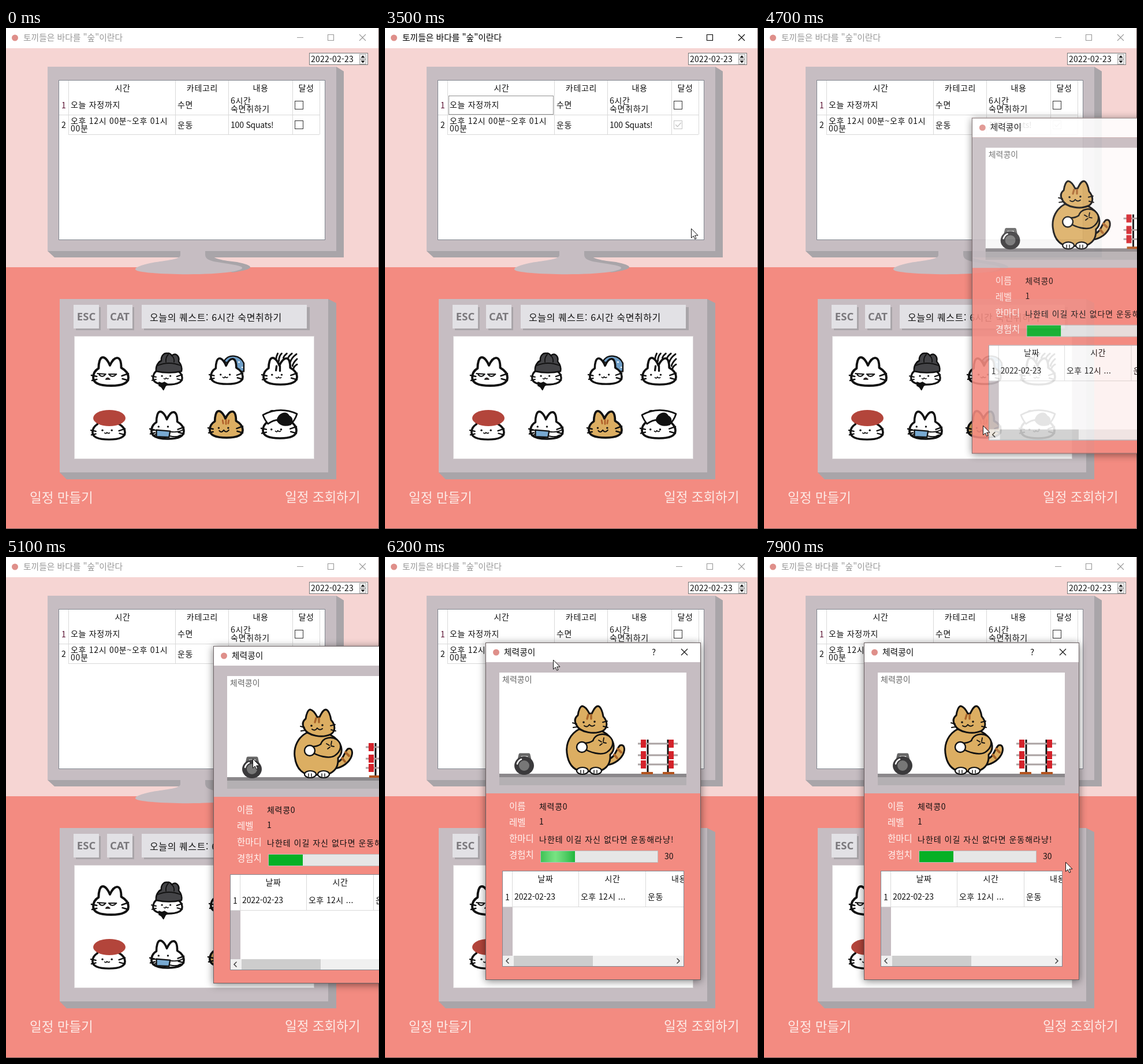
Recreate the animation shown at these times as an HTML page. Size 646 by 867 pixels, loop 8 s.

```html
<!DOCTYPE html>
<html lang="ko">
<head>
<meta charset="utf-8">
<title>Schedule</title>
<style>
html, body { margin: 0; width: 100%; height: 100%; overflow: hidden; }
svg { display: block; }
#stage { width: 100vw; height: 100vh; }
text { font: 14px "Noto Sans CJK KR", "Noto Sans CJK JP", "Noto Sans CJK", sans-serif; white-space: pre; }
#dialog > rect:first-child { filter: drop-shadow(0 2px 7px rgba(0,0,0,.5)); }
</style>
</head>
<body>
<svg id="stage" viewBox="0 0 646 867" preserveAspectRatio="none"></svg>
<script>
const LOOP = 8000, STEP = 100;
const GREY = '#c6bdc2', SHADE = '#a9a5a9', SALMON = '#f38b81', INK = '#111';

const rect = (x, y, w, h, fill, more = '') =>
  `<rect x="${x}" y="${y}" width="${w}" height="${h}" fill="${fill}" ${more}/>`;
const path = (d, fill = 'none', stroke = 'none', width = 1, more = '') =>
  `<path d="${d}" fill="${fill}" stroke="${stroke}" stroke-width="${width}" stroke-linecap="round" stroke-linejoin="round" ${more}/>`;
const line = (d, color = '#d9d9d9', width = 1) =>
  `<path d="${d}" fill="none" stroke="${color}" stroke-width="${width}"/>`;
const oval = (x, y, rx, ry, fill, more = '') =>
  `<ellipse cx="${x}" cy="${y}" rx="${rx}" ry="${ry}" fill="${fill}" ${more}/>`;
const text = (s, x, y, { size = 14, gap = .7, fill = INK, mid = false, more = '' } = {}) =>
  `<text x="${x}" y="${y}" fill="${fill}" letter-spacing="${gap}" style="font-size:${size}px;${more}"${mid ? ' text-anchor="middle"' : ''}>${s}</text>`;
const group = (inner, attrs) => `<g ${attrs}>${inner}</g>`;
const frame = (x, y, w, h, fill, stroke) => rect(x + .5, y + .5, w - 1, h - 1, fill, `stroke="${stroke}"`);
const cross = (x, y) => `M${x} ${y}l11 11m0-11l-11 11`;

// A cat head drawn in a 62 x 52 box
const HEAD = 'M2 37C2 28 6 24 11 21C11 12 13 2 18 2C23 2 28 10 30 16C33 9 38 2 43 3C48 4 49 13 49 20C56 24 61 30 61 37C61 47 50 51 32 51C12 51 2 47 2 37Z';
const WHISKERS = 'M-1 33l9 2M0 42l8-2M50 34l11-4M51 39l10 3';
const eyes = (x = 20, y = 33) => oval(x, y, 1.8, 1.8, INK) + oval(x + 17, y, 1.8, 1.8, INK);
const MOUTH = path('M24 38q3 3 4-1q3 3 5 1', 'none', INK, 1.8);

function cat(x, y, w, h, { fill = '#fff', back = '', front = eyes() + MOUTH } = {}) {
  const inner = back + path(HEAD, fill, INK, 3.8) + path(WHISKERS, 'none', INK, 2.6) + front;
  return group(inner, `transform="translate(${x} ${y}) scale(${w / 62} ${h / 52})"`);
}

function cats() {
  const grumpy = path('M9 30l14 1M28 31h13M12 32q5 6 10 0M29 32q5 6 11 0', 'none', INK, 2) +
    path('M23 40q3-5 7 0Z', '#744', INK, 1.5);
  const hood = path('M260 594C259 584 264 578 269 576C268 567 274 562 279 563C283 562 286 565 287 567C294 561 301 568 299 577C304 583 305 589 304 594Q282 599 260 594Z', '#444447', INK, 2.6) +
    path('M263 584Q282 576 302 584M281 565q-5 5-4 13M287 567q5 4 4 11', 'none', INK, 1.8);
  const beard = path('M14 46l6 2 5-2 7 4-5 4-4 8-4-6-5-3Z', INK, INK, 2);
  const nightcap = path('M27 6C36-7 56-5 63 11V27H54Q48 12 28 9Z', '#6f9fc8', INK, 2.6) +
    oval(44, 3, 1.6, 1.6, '#fff') + oval(54, 9, 1.6, 1.6, '#fff') + oval(60, 19, 1.3, 1.3, '#fff');
  const stripes = path('M27-6q-3 6-3 11M34-6q-5 5-5 14M43-6q-5 4-6 8M52-6q-6 5-7 9M60-5q-9 7-11 15M61 4q-7 7-8 13M61 14q-5 3-6 7', 'none', INK, 3);
  const mask = path('M2 36L12 35M36 38Q50 40 59 35M10 43l-5 2M36 46q12 3 19-2', 'none', INK, 2) +
    path('M11 35L36 37L34 48L11 47Z', '#78a9d1', INK, 2.5);
  const tabby = path('M25 19l1 6M31 18v8M36 19l-1 6', 'none', '#b0602a', 2.8) + eyes(18) +
    path('M19 38q4 5 8-1q4 6 9 0', 'none', INK, 2.2);
  const brim = path('M2 9Q31-7 62 7Q58 20 50 26Q30 10 11 25Q5 18 2 9Z', '#fff', INK, 2.8);
  const blob = path('M27 19C29 7 42 1 48 11C55 14 54 22 51 26Q38 31 30 23Z', INK, INK, 2);
  return cat(149, 568, 64, 52, { front: grumpy }) +
    cat(253, 575, 53, 43, { front: eyes() + MOUTH + beard }) + hood +
    cat(353, 570, 58, 47, { back: nightcap }) +
    cat(444, 569, 61, 49, { back: stripes, front: eyes(17) + MOUTH + path('M25 17l-1 8M31 17v9', 'none', INK, 3.4) }) +
    cat(148, 667, 59, 46) + oval(179, 675, 28, 14, '#b3453b') +
    cat(250, 662, 59, 50, { front: eyes(15, 29) + mask }) +
    cat(351, 661, 60, 49, { fill: '#dcae62', front: tabby }) +
    cat(443, 661, 61, 50, { front: brim + blob + eyes(17, 35) + MOUTH });
}

function keycap(x, label) {
  return rect(x + 4, 483, 43, 40, SHADE) + rect(x, 479, 44, 41, '#e2e1e5') +
    text(label, x + 22, 506, { size: 18.5, gap: 0, fill: '#7b797d', mid: true, more: 'font-family:Open Sans,sans-serif;font-weight:700' });
}

function monitor() {
  const neckSide = 'M345 386H352C354 401 378 402 400 405C430 411 434 417 392 423L340 405Z';
  const stand = 'M302 385V393C302 402 270 402 245 408C221 414 217 419 236 422C270 427 350 428 390 422C417 417 412 413 396 410C365 404 345 405 345 392V385Z';
  return path('M572 67L585 75V397H84L72 386H572Z', SHADE) + path(neckSide, SHADE) + path(stand, GREY) +
    rect(72, 67, 500, 319, GREY) + frame(91, 90, 462, 277, '#fff', '#828790');
}

function quests() {
  const head = [['시간', 202], ['카테고리', 340], ['내용', 441], ['달성', 520]];
  return line('M108.5 91V184M293.5 91V184M385.5 91V184M496.5 91V184M543.5 91V184M92 150.5H543M108 184.5H543') +
    head.map(([s, x]) => text(s, x, 109, { mid: true })).join('') +
    text('1', 96, 139, { fill: '#5a1030' }) + text('2', 96, 173) +
    text('오늘 자정까지', 112, 138) + text('수면', 297, 138) +
    text('6시간', 389, 131) + text('숙면취하기', 389, 145) +
    text('오후 12시 00분~오후 01시', 112, 166) + text('00분', 112, 179) +
    text('운동', 297, 173) + text('100 Squats!', 389, 173, { gap: -.2 }) +
    frame(500, 126, 15, 15, '#fff', '#333') +
    group(frame(500, 160, 15, 15, '#fff', 'currentColor') +
      path('M503.5 167.5l3 3.2 6-6.5', 'none', 'currentColor', 1.4, 'id="tick"'), 'id="box"') +
    rect(110.5, 117.5, 181, 32, 'none', 'id="focus" stroke="#222" stroke-dasharray="1 1"');
}

function mainWindow() {
  return rect(0, 0, 646, 35, '#fff') + rect(0, 35, 646, 379, '#f6d5d3') + rect(0, 414, 646, 453, SALMON) +
    line('M645.5 0V866.5H0', '#6e5a5a') +
    oval(15.5, 17, 5.5, 5.5, '#df8f8a') +
    group(text('토끼들은 바다를 "숲"이란다', 30, 22, { size: 14.8, gap: 0, fill: 'currentColor' }) +
      line('M504 16.5h11M557.5 11.5h10v10h-10z' + cross(612, 11), 'currentColor', 1.1), 'id="caption"') +
    // date box
    frame(525, 43, 102, 21, '#fff', '#777') + text('2022-02-23', 528, 59, { gap: .2 }) +
    frame(612, 45, 12, 9, '#eee', '#aaa') + frame(612, 54, 12, 9, '#eee', '#aaa') +
    path('M614.5 51.5h7l-3.5-4zM614.5 56.5h7l-3.5 4z', INK) +
    monitor() + quests() +
    // lower panel
    path('M558 469L572 476V781H105L93 769H558Z', SHADE) + rect(93, 469, 465, 300, GREY) +
    keycap(117, 'ESC') + keycap(175, 'CAT') +
    rect(239, 483, 287, 40, SHADE) + rect(235, 479, 286, 41, '#e2e1e5') +
    text('오늘의 퀘스트: 6시간 숙면취하기', 249, 507, { size: 16, gap: .6 }) +
    frame(118, 533, 416, 213, '#fff', '#dcd8da') + cats() +
    text('일정 만들기', 41, 821, { size: 22.5, gap: 0, fill: '#fdebe7', more: 'font-weight:500' }) +
    text('일정 조회하기', 483, 820, { size: 22.5, gap: 0, fill: '#fdebe7', more: 'font-weight:500' });
}

function gymCat() {
  const tan = '#dcae62';
  return path('M214 201C224 200 227 183 233 178C240 175 243 184 238 194C232 205 219 212 208 212Z', tan, INK, 3) +
    path('M229 184l6 6M223 194l5 6', 'none', '#a9642a', 4) +
    path('M162 150C147 158 139 174 141 191C143 208 151 220 166 223H196C212 218 217 208 216 194C225 186 224 172 214 162C207 155 200 152 194 151Z', tan, INK, 3) +
    path('M157 142C153 134 156 129 160 126C161 118 164 110 168 110C173 111 177 117 180 123H184C187 117 190 110 195 110C200 111 203 121 204 128C212 137 212 148 203 153C190 159 164 157 157 142Z', tan, INK, 3) +
    path('M178 125l-2 7M183 125v7', 'none', '#a9642a', 3.4) +
    oval(170, 138, 1.8, 1.8, INK) + oval(189, 137, 1.8, 1.8, INK) +
    path('M171 144q5 4 9-2q4 5 9 1', 'none', INK, 2) +
    path('M151 139l7 2M152 147l7-1M203 138l8-2M204 145l8 2', 'none', INK, 2) +
    path('M170 183C180 190 200 196 210 190C222 182 224 170 214 162C205 156 190 158 186 170Q180 174 172 174', tan, INK, 2.6) +
    oval(167, 181, 9, 9, '#fff', `stroke="${INK}" stroke-width="2.4"`) +
    path('M196 169l5 3M205 165l-1 6M198 178l4-3M209 174l-5-1', 'none', INK, 1.8) +
    oval(168, 222, 10, 6, '#fff', `stroke="${INK}" stroke-width="2.2"`) +
    oval(191, 222, 10, 6, '#fff', `stroke="${INK}" stroke-width="2.2"`) +
    path('M165 221v5M170 221v5M188 221v5M193 221v5', 'none', INK, 1.4);
}

function gym() {
  const bars = [175, 195, 211].map(y =>
    rect(264, y - 1.5, 69, 3, '#aaa2a2') + rect(269, y - 7, 9, 14, '#d4232b') + rect(317, y - 7, 9, 14, '#d4232b')).join('');
  return rect(24, 52, 324, 176, '#fff') + rect(24, 227, 324, 6, '#8b888b') + rect(24, 233, 324, 14, '#b4b0b3') +
    text('체력콩이', 29, 69, { gap: 0, fill: '#666', more: 'font-weight:500' }) +
    path('M58 203L60 194H75L77 203', 'none', '#666', 5) +
    oval(67, 213, 17, 16, '#3b3a3c') + oval(67, 213, 9, 9, '#777') +
    path('M55 210q2-6 7-8', 'none', '#fff', 2.5) +
    rect(279.5, 168, 3, 57, INK) + rect(314.5, 168, 3, 57, INK) + bars +
    rect(270, 224, 20, 4, '#b3541e') + rect(307, 224, 20, 4, '#b3541e') + gymCat();
}

function dialog() {
  const labels = [['이름', 289], ['레벨', 317], ['한마디', 345], ['경험치', 373]];
  return rect(0, 0, 373, 584, SALMON) + rect(0, 0, 373, 34, '#fff') + rect(0, 34, 373, 227, GREY) +
    oval(18.5, 17, 5.5, 5.5, '#df8f8a') + text('체력콩이', 32, 22, { size: 14.8, gap: 0 }) +
    text('?', 288, 22, { size: 15 }) + line(cross(339, 11), INK, 1.2) + gym() +
    labels.map(([s, y]) => text(s, 41, y, { size: 15.5, gap: 0, fill: '#fff3f0', more: 'font-weight:500' })).join('') +
    text('체력콩0', 93, 289) + text('1', 93, 315) +
    text('나한테 이길 자신 없다면 운동해라냥!', 93, 346, { gap: 1 }) +
    frame(95, 360, 204, 21, '#e6e6e6', '#bcbcbc') + rect(96, 361, 59, 19, '#06b025') +
    `<svg x="96" y="361" width="59" height="19">${rect(0, 0, 80, 19, 'url(#glow)', 'id="shine"')}</svg>` +
    text('30', 310, 375, { gap: 0 }) +
    `<svg x="29" y="395" width="315" height="166">` +
      rect(0, 0, 315, 166, '#fff') + rect(1, 62, 17, 85, GREY) +
      line('M17.5 0V62M132.5 0V62M248.5 0V62M0 62.5H315') +
      text('날짜', 75, 19, { mid: true }) + text('시간', 191, 19, { mid: true }) + text('내용', 293, 19) +
      text('1', 5, 51) + text('2022-02-23', 21, 50, { gap: -.1 }) + text('오후 12시 ...', 136, 50, { gap: .4 }) + text('운동', 252, 50) +
      rect(0, 147, 315, 19, '#f0f0f0') + rect(20, 147, 137, 18, '#cdcdcd') +
      path('M11 152l-4 4 4 4M303 152l4 4-4 4', 'none', '#444', 1.6) +
      frame(0, 0, 315, 166, 'none', '#828790') + '</svg>' +
    frame(0, 0, 373, 584, 'none', '#6b6062');
}

const stage = document.getElementById('stage');
stage.innerHTML =
  `<defs><linearGradient id="glow"><stop offset="0" stop-color="#fff" stop-opacity="0"/>
   <stop offset=".5" stop-color="#b4ffb4" stop-opacity=".65"/><stop offset="1" stop-color="#fff" stop-opacity="0"/></linearGradient></defs>` +
  mainWindow() + group(dialog(), 'id="dialog"') +
  path('M.5 .5V16.3L4.2 12.9L6.7 18.3L9 17.3L6.6 12H11.7Z', '#fff', INK, 1, 'id="cursor"');

const [caption, tick, box, focusRing, win, shine, cursor] =
  ['caption', 'tick', 'box', 'focus', 'dialog', 'shine', 'cursor'].map(id => document.getElementById(id));

// Keys are [time, x, y]
const pointer = [
  [300, 213, 211], [400, 160, 190], [500, 123, 176], [600, 123, 176], [700, 130, 174], [800, 172, 171],
  [900, 275, 164], [1000, 355, 175], [1200, 433, 182], [1300, 455, 182], [1400, 482, 182], [1500, 511, 181],
  [1600, 512, 181], [1900, 512, 181], [2400, 506, 169], [3400, 506, 169], [3500, 530, 347], [3600, 475, 599],
  [3700, 475, 599], [3800, 434, 645], [4000, 379, 688], [4700, 379, 688], [5000, 408, 450], [5200, 446, 247],
  [5300, 480, 200], [5700, 477, 184], [6000, 477, 184], [6200, 291, 178], [6800, 291, 178],
  [7200, 392, 330], [7700, 296, 500], [7900, 522, 528]];
const place = [[6000, 359, 154], [6200, 174, 148], [6300, 173, 148]];
// Keys are [time, opacity, scale]
const opening = [[4400, 0, .95], [4500, .2, .965], [4600, .65, .985], [4700, .89, .995], [4900, 1, 1]];

function at(keys, t) {
  const i = keys.findIndex(k => k[0] > t);
  if (i === 0) return keys[0].slice(1);
  if (i < 0) return keys[keys.length - 1].slice(1);
  const a = keys[i - 1], b = keys[i], p = (t - a[0]) / (b[0] - a[0]);
  return [a[1] + (b[1] - a[1]) * p, a[2] + (b[2] - a[2]) * p];
}
const show = (node, on) => node.setAttribute('display', on ? 'inline' : 'none');

function draw(time) {
  const t = Math.floor(time / STEP) * STEP;
  const active = t >= 2900 && t < 4500;
  caption.setAttribute('color', active ? '#000' : '#999');
  show(tick, t >= 3000);
  box.setAttribute('color', t >= 3000 ? '#c4c4c4' : '#333');
  show(focusRing, t >= 3100 && t < 4300);

  const [cx, cy] = at(pointer, t);
  show(cursor, t >= 300);
  cursor.setAttribute('transform', `translate(${Math.round(cx)} ${Math.round(cy)})`);

  const [x, y] = at(place, t), [alpha, scale] = at(opening, t);
  show(win, t >= 4500);
  win.setAttribute('opacity', alpha);
  win.setAttribute('transform',
    `translate(${Math.round(x) + 186.5 * (1 - scale)} ${Math.round(y) + 292 * (1 - scale)}) scale(${scale})`);
  // a glow sweeps along the progress bar every 1.4 s
  shine.setAttribute('x', -80 + .65 * ((t + 900) % 1400));
}

function play() {
  draw(performance.now() % LOOP);
  requestAnimationFrame(play);
}
play();
</script>
</body>
</html>
```
